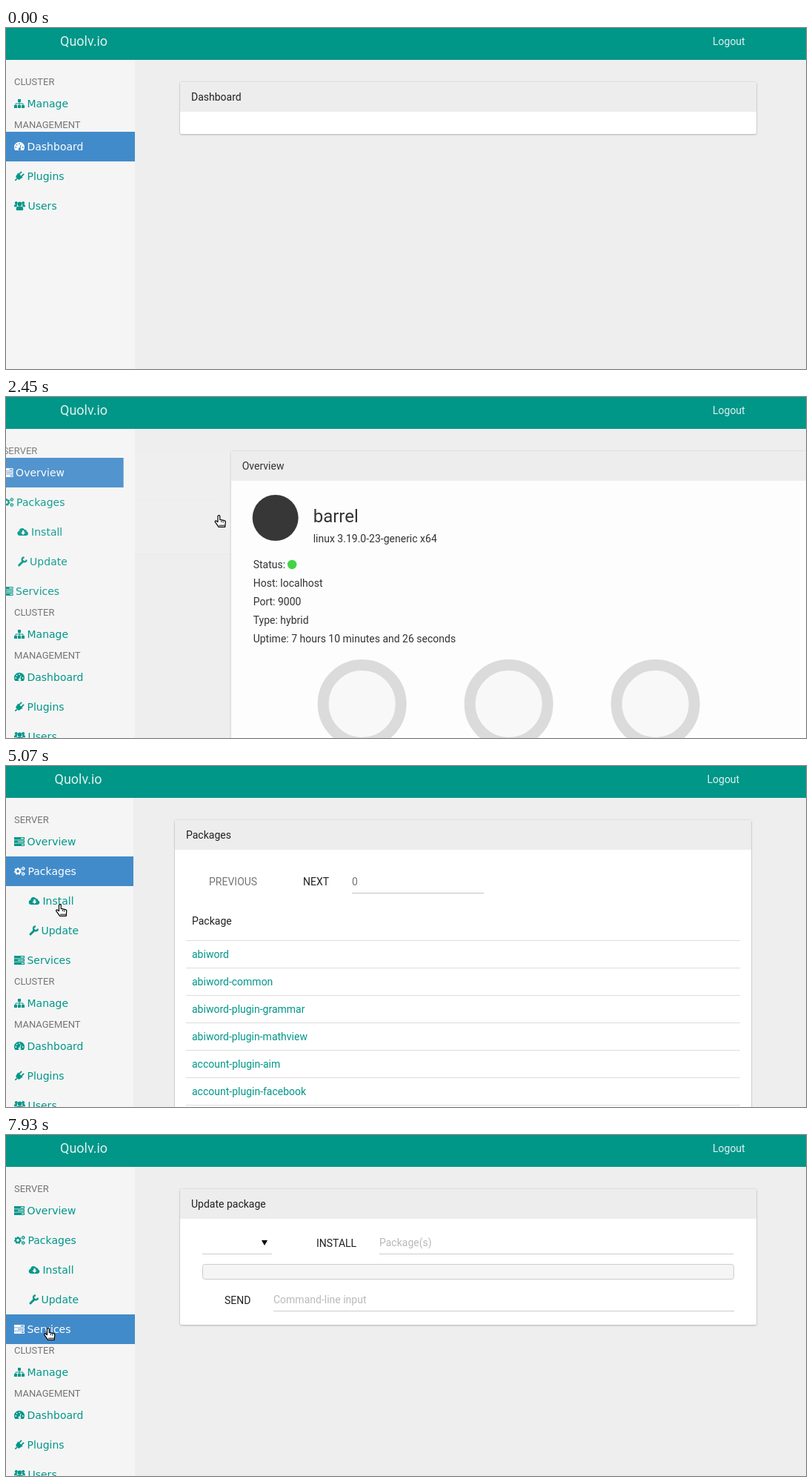
Write an HTML page that moves like this. It is 1080x460 px and loops after 8000 ms.

```html
<!DOCTYPE html>
<html lang="en">
<head>
<meta charset="utf-8">
<title>Cluster admin</title>
<style>
  html, body { margin: 0; width: 100%; height: 100%; overflow: hidden; background: #eee; }
  svg { display: block; }
  text { font: 14px Roboto, sans-serif; fill: #212121; white-space: pre; }
  .bar text { fill: #fff; fill-opacity: .87; }
  .label { font-size: 13px; fill: #757575; }
  .item { color: #009688; }
  .item text { font-family: "DejaVu Sans", sans-serif; fill: currentColor; }
  .item rect { fill: none; }
  .item.on { color: #fff; }
  .item.on rect { fill: #428bca; }
  .icon { fill: currentColor; fill-rule: evenodd; }
  .icon .line { fill: none; stroke: currentColor; }
  .side rect { width: var(--side); }
  .card { fill: #fff; filter: drop-shadow(0 1px 1px rgba(0, 0, 0, .2)) drop-shadow(0 0 1px rgba(0, 0, 0, .14)); }
  .link { fill: #009688; }
  .hover { text-decoration: underline; }
  .dim { fill: #757575; }
  .hint { fill: #b9b9b9; }
</style>
</head>
<body>
<svg id="stage" width="1080" height="460" viewBox="0 0 1080 460"></svg>
<script>
const LOOP = 8000, SLIDE = 400, CARD_W = 778;

// Markup helpers
const text = (x, y, s, cls = '', extra = '') => `<text x="${x}" y="${y}" class="${cls}" ${extra}>${s}</text>`;
const rule = (x1, x2, y, color = '#ddd') => `<path d="M${x1} ${y + .5}H${x2}" stroke="${color}"/>`;
const path = (d, extra = '') => `<path d="${d}" ${extra}/>`;
const disc = (x, y, r, fill) => `<circle cx="${x}" cy="${y}" r="${r}" fill="${fill}"/>`;
const dot = (x, y, r) => `M${x - r} ${y}a${r} ${r} 0 1 0 ${2 * r} 0a${r} ${r} 0 1 0 ${-2 * r} 0z`;
const ring = (x, y, r, w, extra = '') =>
  `<circle class="line" cx="${x}" cy="${y}" r="${r}" stroke-width="${w}" ${extra}/>`;
const cog = (x, y, r, w, dash) => ring(x, y, r, w) + ring(x, y, r + w * .7, w * .7, `stroke-dasharray="${dash}"`);

// Icons: [advance width, markup], centred on y = 0
const icons = {
  tasks: [14, path('M0-6h14v3.4H0zM9-4.9h4v1.2H9zM0-1.7h14v3.4H0zM5-.6h8V.6H5zM0 2.6h14V6H0zM10 3.7h3v1.2h-3z')],
  cogs: [15, cog(5, 0, 2.9, 2, 1.9) + cog(12.2, -3.6, 1.5, 1.1, 1.1) + cog(12.2, 3.6, 1.5, 1.1, 1.1)],
  cloud: [15, path('M3.2 5a3.2 3.2 0 0 1-1-6.3A4 4 0 0 1 9.7-3a2.5 2.5 0 0 1 2.7 2.4A2.9 2.9 0 0 1 12 5zM6.3-2v2.8h-2L7.5 4l3.2-3.2h-2V-2z')],
  wrench: [13, path('M2 5 7.5-.5', 'class="line" stroke-width="3" stroke-linecap="round"') +
    path('M9-5.6A3 3 0 1 0 12-2.4', 'class="line" stroke-width="2.2"')],
  sitemap: [14, path('M5-6h4v4H5zM0 2h4v4H0zM5 2h4v4H5zM10 2h4v4h-4z') +
    path('M7-2v4M2 2V0h10v2', 'class="line"')],
  gauge: [14, path('M1.4 5A7 7 0 1 1 12.6 5z' + dot(2.3, 1, .9) + dot(3.6, -2.4, .9) + dot(7, -3.9, .9) +
    dot(11.7, 1, .9) + 'M8.7-2.4l.9.3-1.2 4a1.7 1.7 0 1 1-1-.3z')],
  plug: [14, `<g transform="rotate(45 7 0)">${path('M2.6-2h8.8v1.6h-.7V1a3.7 3.7 0 0 1-7.4 0V-.4h-.7zM4-6.5h1.7V-2H4zM8.3-6.5H10V-2H8.3zM6.2 4h1.6v4H6.2z')}</g>`],
  users: [15, path(dot(2.8, -4, 2) + dot(12.2, -4, 2) + 'M0 1.2C-.2-1.4 1-2 2-2h2l-.4 3.2zM15 1.2C15.2-1.4 14-2 13-2h-2l.4 3.2z') +
    path(dot(7.5, -2.5, 2.9) + 'M3 6C2.2 2.2 3.8.8 5 .8h5c1.2 0 2.8 1.4 2 5.2z')],
};

const label = (y, s) => text(11, y + 5, s, 'label');
const item = (y, icon, s, x = 11) => `<g class="item" id="${s}"><rect y="${y - 20}" height="40"/>
  <g class="icon" transform="translate(${x} ${y})">${icons[icon][1]}</g>
  ${text(x + icons[icon][0] + 3.47, y + 5, s)}</g>`;

// Views
const card = (h, title) => `<rect class="card" x="235" y="73" width="${CARD_W}" height="${h}" rx="2"/>` +
  (title ? `<rect x="235" y="73" width="${CARD_W}" height="40" fill="#ededed"/>` + text(250, 98, title) : '');
const check = x => disc(x, 158, 6, '#32c832') +
  path(`M${x - 3} 158l2.2 2.2 4-4`, 'fill="none" stroke="#fff" stroke-width="1.9"');
const columns = [[258, 'Hostname'], [435, 'Web'], [531, 'Worker'], [665, 'Online'], [788, 'Free memory']];
const packages = ['abiword', 'abiword-common', 'abiword-plugin-grammar', 'abiword-plugin-mathview',
  'account-plugin-aim', 'account-plugin-facebook'];
const details = ['Status:', 'Host: localhost', 'Port: 9000', 'Type: hybrid', 'Uptime: 7 hours 10 minutes and 26 seconds'];

const packageForm = title => card(183, title) +
  rule(265, 359, 160, '#ccc') + path('M345 142h8l-4 7z') + text(419, 151, 'INSTALL') +
  rule(504, 982, 160, '#ccc') + text(504, 150, 'Package(s)', 'hint') +
  '<rect x="265.5" y="174.5" width="717" height="20" rx="3" fill="#f5f5f5" stroke="#ccc"/>' +
  text(295, 228, 'SEND') + rule(361, 983, 237, '#ccc') + text(361, 227, 'Command-line input', 'hint');

const views = [
  { start: -SLIDE, html: card(70, 'Dashboard') },
  { start: 585, html: card(138) + columns.map(([x, s]) => text(x, 118, s)).join('') + rule(250, 998, 139) +
      `<g id="row">${text(258, 163, 'barrel', 'link', 'id="host"')}${[441, 537, 671].map(check).join('')}${text(788, 163, '1.5 GB')}</g>` },
  { start: 2194, html: card(460, 'Overview') + disc(295, 163, 31, '#262626') +
      text(346, 169, 'barrel', '', 'style="font-size:24px"') + text(346, 196, 'linux 3.19.0-23-generic x64') +
      details.map((s, i) => text(265, 231 + 25 * i, s)).join('') + disc(317.5, 226, 6.2, '#32d232') +
      `<g id="gauges" fill="#fafafa" stroke-width="15">${[412, 610, 808].map(x => `<circle cx="${x}" cy="414" r="52.5"/>`).join('')}</g>` },
  { start: 4425, html: card(460, 'Packages') + text(281, 161, 'PREVIOUS', 'dim') + text(408, 161, 'NEXT') +
      text(474, 161, '0', 'dim') + rule(474, 652, 171, '#c4c4c4') + text(258, 214, 'Package') + rule(250, 998, 235) +
      packages.map((s, i) => text(258, 259 + 37 * i, s, 'link') + rule(250, 998, 272 + 37 * i)).join('') },
  { start: 5609, html: packageForm('Install package') },
  { start: 6935, html: packageForm('Update package') },
];

const stage = document.getElementById('stage');
stage.innerHTML = `
  <rect width="1080" height="460" fill="#eee"/>
  <g id="main">${views.map((v, i) => `<g id="view${i}">${v.html}</g>`).join('')}</g>
  <g class="side"><rect y="43" height="417" fill="#f5f5f5"/>
    <g id="server">${label(72, 'SERVER')}${item(102, 'tasks', 'Overview')}${item(142, 'cogs', 'Packages')}
      ${item(182, 'cloud', 'Install', 31)}${item(222, 'wrench', 'Update', 31)}${item(262, 'tasks', 'Services')}</g>
    <g id="common">${label(72, 'CLUSTER')}${item(102, 'sitemap', 'Manage')}${label(130, 'MANAGEMENT')}
      ${item(160, 'gauge', 'Dashboard')}${item(200, 'plug', 'Plugins')}${item(240, 'users', 'Users')}</g></g>
  <rect width="1080" height="43" fill="#009688"/>
  <g class="bar" id="bar">${text(73, 24, 'Quolv.io', '', 'style="font-size:18px"')}${text(954, 23, 'Logout')}</g>
  <g id="cursor" fill="#fff" stroke="#000" stroke-width="1.2" stroke-linejoin="round">
    <g id="hand">${path('M4.5 2a1.4 1.4 0 0 1 2.8 0v4.4l5.6 1.2a2.2 2.2 0 0 1 1.9 2.4l-.6 6.4H5.6L3 12.6.8 9.7a1.2 1.2 0 0 1 1.8-1.5l1.9 1.5z')}
      ${path('M6 14.2h8M9.3 8v2M11.6 8.5v2', 'stroke-width="1"')}</g>
    ${path('M6 .5v14l3.3-3 2.2 5 2.2-1-2.2-4.8H16z', 'id="arrow"')}</g>`;

const $ = id => document.getElementById(id);
const move = (id, x, y = 0) => $(id).setAttribute('transform', `translate(${x} ${y})`);
const show = (id, visible) => { $(id).style.display = visible ? '' : 'none'; };
const fade = (id, a) => { $(id).style.opacity = a; };

// Progress along the CSS "ease" curve
function ease(x) {
  if (x <= 0 || x >= 1) return Math.min(1, Math.max(0, x));
  let lo = 0, hi = 1, u;
  for (let i = 0; i < 20; i++) {
    u = (lo + hi) / 2;
    if (.75 * u * (1 - u) + u ** 3 < x) lo = u; else hi = u;
  }
  return .3 * u * (1 - u) ** 2 + 3 * u * u * (1 - u) + u ** 3;
}

const selections = [[0, 'Dashboard'], [570, 'Manage'], [2194, 'Overview'], [3830, 'Packages'],
  [5480, 'Install'], [6780, 'Update'], [7930, 'Services']];

// Pointer: time, x, y
const track = [[140, 136, 190], [380, 13, 97], [430, 17, 103], [1380, 17, 103], [1560, 95, 170], [1740, 210, 188],
  [1900, 292, 175], [2050, 281.5, 159], [3040, 281.5, 159], [3430, 88, 142], [4780, 88, 142], [5070, 67, 186],
  [6100, 67, 186], [6430, 62, 213], [6480, 63, 218], [7350, 63, 218], [7670, 51, 260], [LOOP, 51, 260]];

function pointer(t) {
  const i = Math.max(1, track.findIndex(k => k[0] > t));
  const [t0, x0, y0] = track[i - 1], [t1, x1, y1] = track[i];
  const p = Math.max(0, (t - t0) / (t1 - t0));
  return [x0 + (x1 - x0) * p, y0 + (y1 - y0) * p];
}

function render(t) {
  const current = views.findLastIndex(v => t >= v.start);
  const p = ease((t - views[current].start) / SLIDE);
  views.forEach((v, i) => {
    const entering = i === current, leaving = i === current - 1 && p < 1;
    show('view' + i, entering || leaving);
    move('view' + i, CARD_W * (entering ? 1 - p : -p));
    fade('view' + i, entering ? p : 1 - p);
  });

  const row = ease((t - 930) / SLIDE);
  move('row', CARD_W * (1 - row));
  fade('row', row);
  const overLink = t >= 1960 && t <= 3040;
  $('host').classList.toggle('hover', overLink);
  $('gauges').setAttribute('stroke', t < 2600 ? '#dadada' : '#d8dfd6');

  // The long package list brings a scrollbar that narrows the layout
  const narrow = t >= views[3].start && t < views[4].start + SLIDE;
  move('main', narrow ? -7 : 0);
  move('bar', narrow ? -7.5 : 0);
  stage.style.setProperty('--side', narrow ? '172px' : '174px');

  const server = ease((t - views[2].start) / SLIDE), hasServer = t >= views[2].start;
  show('server', hasServer);
  move('server', -174 * (1 - server));
  fade('server', server);
  move('common', 0, hasServer ? 218 : 0);
  const selected = selections.findLast(s => t >= s[0])[1];
  document.querySelectorAll('.item').forEach(el => el.classList.toggle('on', el.id === selected));

  const [x, y] = pointer(t), isArrow = x > 168 && !overLink;
  show('cursor', t >= 140);
  move('cursor', x, y);
  show('arrow', isArrow);
  show('hand', !isArrow);
}

function frame() {
  render(performance.now() % LOOP);
  requestAnimationFrame(frame);
}
frame();
</script>
</body>
</html>
```
